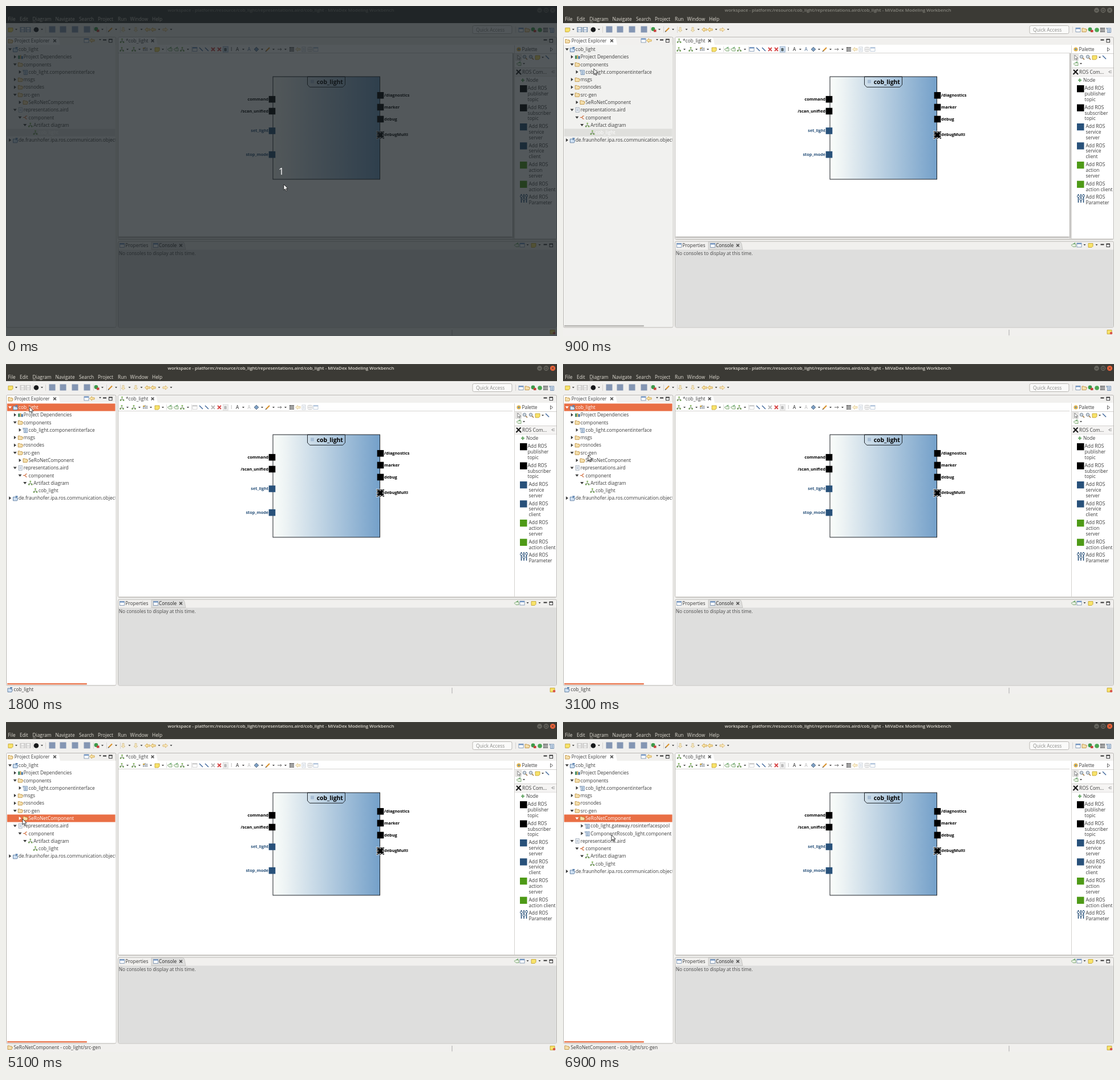
These frames come from a looping animation (966 px wide and 579 px high, 8000 ms). An HTML page:

```html
<!DOCTYPE html>
<html lang="en">
<head>
<meta charset="utf-8">
<title>Workspace</title>
<style>
html, body { margin: 0; width: 100%; height: 100%; overflow: hidden; background: #f1f0ee; }
svg { display: block; width: 100%; height: 100%; }
text { font: 8.35px "Open Sans", "Noto Sans", sans-serif; white-space: pre; }
.b { font-weight: 700; font-size: 7.35px; }
.name { font-weight: 700; font-size: 10.4px; }
.title { font-weight: 600; font-size: 7.9px; fill: #87867e; }
.active .title { fill: #dfdbd2; }
.close { fill: #64635c; }
.active .close { fill: #e9633a; }
.treebg { fill: #f1f1ef; }
.active .treebg { fill: #fff; }
.row { color: #3c3c3c; }
.row.sel { color: #fff; }
.hl { fill: #dfdfdc; }
.focus .hl { fill: #e96f45; }
.bar { fill: #b9b8b5; }
.active .bar { fill: #ea7b55; }
.active .off { filter: grayscale(1); opacity: .45; }
.count { font-size: 17px; fill: #fff; }
</style>
</head>
<body>
<svg id="stage" viewBox="0 0 966 579" preserveAspectRatio="none"></svg>
<script>
const stage = document.getElementById('stage');
const INK = '#3c3c3c', EDGE = '#bbb9b5', BLUE = '#28517a', GREEN = '#4e9a17';

const rect = (x, y, w, h, fill, more = '') =>
  `<rect x="${x}" y="${y}" width="${w}" height="${h}" fill="${fill}" ${more}/>`;
const shape = (d, fill, more = '') => `<path d="${d}" fill="${fill}" ${more}/>`;
const line = (d, color = INK, w = 1) => shape(d, 'none', `stroke="${color}" stroke-width="${w}"`);
const dot = (x, y, r, fill, more = '') => `<circle cx="${x}" cy="${y}" r="${r}" fill="${fill}" ${more}/>`;
const text = (x, y, s, fill = INK, more = '') => `<text x="${x}" y="${y}" fill="${fill}" ${more}>${s}</text>`;
const group = (s, more = '') => `<g ${more}>${s}</g>`;
const at = (x, y, s) => group(s, `transform="translate(${x} ${y})"`);

// small icons, drawn around their own centre
const icon = {
  folder: shape('M-4-3h3l1 1h3v1.5h1.5l-1.5 4h-7z', '#f4dfad', 'stroke="#b98a35" stroke-width=".8"'),
  project: shape('M-4-2h3l1 1h3v1.5h1.5l-1.5 4h-7z', '#cfe0f2', 'stroke="#4d6f96" stroke-width=".8"') + rect(0, -4, 4, 2.5, '#5b82b0'),
  lib: rect(-4, -2.5, 3, 6, '#3c8b62') + rect(-.8, -3, 2, 6.5, '#c9a04a') + rect(1.5, -1.5, 3, 5, '#4a78a8'),
  doc: rect(-3, -4, 6, 8, '#fff', 'stroke="#8a99ab" stroke-width=".8"') + line('M-1.5-1.5h3M-1.5 0h3M-1.5 1.5h3', '#7a93b2', .7),
  model: rect(-2.5, -3, 6, 7.5, '#e4edf7', 'stroke="#5e7fa5" stroke-width=".8"') + line('M-1-1h3M-1 1h3M-1 3h3M-4-4v3', '#46709c', .8),
  comp: line('M-4 0h3M3-2.5h-2l-2 2.5l2 2.5h2', '#cf6a3a', 1.2),
  chart: line('M0-2v2M-2.5 3v-2h5v2', '#55704a', .8) + rect(-1.3, -4, 2.6, 2.4, '#8dbb6a') + rect(-3.8, 1.5, 2.6, 2.2, '#6c9a52') + rect(1.2, 1.5, 2.6, 2.2, '#6c9a52'),
  save: rect(-4, -4, 8, 8, '#a9bcd3', 'stroke="#71879f" stroke-width=".8"') + rect(-2, -3.5, 4, 2.8, '#f5f7fa') + rect(-2, 1, 4, 3, '#e5eaf0'),
  window: rect(-4, -3.5, 8, 7, '#fff', 'stroke="#7189a8" stroke-width=".8"') + rect(-4, -3.5, 8, 2, '#6e94c4'),
  note: shape('M-4-3h8v5l-2 2h-6z', '#f8e36b', 'stroke="#bd9d27" stroke-width=".8"'),
  pencil: line('M-3 3L3-3', '#d9932e', 2.2) + line('M-4 4l1.5-1.5', '#555', 1.2),
  stroke: line('M-3-3L3 3', '#41689b', 1.4),
  cross: line('M-3-3L3 3M3-3L-3 3', '#d64545', 1.8),
  arrow: line('M-4 0h7M1-2l2 2l-2 2', '#555', .9),
  back: shape('M-4.5 0l4-3.5v2h4.5v3h-4.5v2z', '#fbe6ab', 'stroke="#c79b3b" stroke-width=".8"'),
  next: shape('M4.5 0l-4-3.5v2h-4.5v3h4.5v2z', '#fbeac0', 'stroke="#d2ae62" stroke-width=".8"'),
  step: shape('M-2-4h3v5h2l-3.5 3l-3.5-3h2z', '#f7e7bd', 'stroke="#ccb98a" stroke-width=".7"'),
  run: dot(-1, -1, 3.4, '#3d9a49') + rect(0, 0, 4.5, 4, '#c8413c'),
  grid: rect(-4, -4, 8, 8, '#666') + line('M-4-1h8M-4 1.5h8M-1-4v8M2-4v8', '#ddd', .8),
  bars: line('M-3-3v6M0-4v7M3-3v6', '#6a7581', 1.2) + rect(-4, -3, 3, 2, '#d6a93e'),
  pin: shape('M-4 0l3-2h5v5h-5z', '#e6efe0', 'stroke="#6e9d66" stroke-width=".8"') + line('M0-2l3-2', '#4f9954', 1.1),
  zoom: dot(-1, -1, 2.7, '#eef3f8', 'stroke="#6b7d90"') + line('M1 1l3 3', '#9a7440', 1.5) + line('M-2.3-1h2.6', '#567', .7),
  frame: line('M-3.5-3.5h7v7h-7zM0-4.5v9M-4.5 0h9', '#909090', .8),
  select: shape('M-2-4v8l2-2l1.5 3l1-.6l-1.4-2.8h2.5z', '#fff', 'stroke="#555" stroke-width=".7"'),
  plus: line('M-3 0h6M0-3v6', '#68a868', 2)
};
const put = (name, x, y) => at(x, y, icon[name]);
const drop = (x, y) => shape(`M${x - 2} ${y - 1}h4l-2 2.4z`, '#444');
const shut = (x, y) => line(`M${x - 2.4} ${y - 2.4}l4.8 4.8m0-4.8l-4.8 4.8`, '#555', 1.5);
const minMax = (x, y) => rect(x - 3, y - 2.5, 6, 2, '#333') +
  rect(x + 7.5, y - 2.7, 5.5, 5.4, '#fff', 'stroke="#333"') + rect(x + 7, y - 3.2, 6.5, 1.8, '#333');
const panel = (x, y, w, h, fill) => rect(x, y, w, h, fill, `rx="2.5" stroke="${EDGE}"`);

function titleAndMenu() {
  const menu = [['File', 3.5], ['Edit', 24], ['Diagram', 46.5], ['Navigate', 86.5], ['Search', 128],
    ['Project', 161], ['Run', 196], ['Window', 217.5], ['Help', 256]];
  return rect(0, 0, 966, 30, '#3b3a35') + rect(0, 0, 966, 1, '#4c4b45') +
    text(482, 10.4, 'workspace - platform:/resource/cob_light/representations.aird/cob_light - MiVaDex Modeling Workbench', '', 'class="title" text-anchor="middle"').replace('fill=""', '') +
    dot(935.5, 7.5, 4.4, '#64635c') + dot(947, 7.5, 4.4, '#64635c') + '<circle cx="958.5" cy="7.5" r="4.6" class="close"/>' +
    line('M933.5 8h4M945 5.8h4v3.5h-4zM956.8 5.8l3.4 3.4m0-3.4l-3.4 3.4', '#302f2b', .9) +
    menu.map(([s, x]) => text(x, 26.3, s, '#dfdbd2')).join('') + line('M47 28h5.5', '#dfdbd2', .6);
}

function toolbar() {
  const marks = [81, 100, 121, 142].map(x => rect(x - 5.5, 35.5, 11, 11, '#8496b3')).join('');
  return rect(0, 30, 966, 23, '#f1f0ee') + put('note', 8, 41.5) +
    group(put('save', 29, 41.5) + put('save', 39, 41.5), 'class="off"') +
    dot(53, 41.5, 4.3, '#17191b') + marks + put('run', 159, 41.5) + put('pencil', 183, 41.5) +
    put('step', 206, 41.5) + put('step', 228, 41.5) + put('back', 248, 41.5) + put('back', 258, 41.5) + put('next', 279, 41.5) +
    [18, 63, 169, 193, 216.5, 237.5, 268.5, 289.5].map(x => drop(x, 41)).join('') +
    [47, 69, 153, 176, 200, 893].map(x => line(`M${x}.5 36v11`, '#d5d3d0')).join('') +
    panel(818, 34.5, 69, 14, '#fafaf9') + text(824, 44.6, 'Quick Access', '#8a8a88') +
    put('window', 903, 42) + put('folder', 914, 42) + put('run', 925, 42) + dot(936, 42, 3.8, '#4ba653') +
    put('grid', 946, 42) + put('model', 957, 42);
}

const rowY = i => 76 + 13.28 * i;
const rows = [
  [0, 1, 'project', 'cob_light'], [1, 0, 'lib', 'Project Dependencies'], [1, 1, 'folder', 'components'],
  [2, 0, 'model', 'cob_light.componentinterface'], [1, 0, 'folder', 'msgs'], [1, 0, 'folder', 'rosnodes'],
  [1, 1, 'folder', 'src-gen'], [2, 0, 'folder', 'SeRoNetComponent'], [1, 1, 'doc', 'representations.aird'],
  [2, 1, 'comp', 'component'], [3, 1, 'chart', 'Artifact diagram'], [4, -1, 'chart', 'cob_light'],
  [0, 0, 'project', 'de.fraunhofer.ipa.ros.communication.objects']
];
const extra = [[3, 0, 'model', 'cob_light.gateway.rosinterfacespool'], [3, 0, 'model', 'ComponentRoscob_light.component']];

function treeRow([level, open, pic, label], i) {
  const x = 7 + 8.75 * level, y = rowY(i);
  const tri = open < 0 ? '' : at(x, y, shape('M-1.8-3l4 3l-4 3z', 'currentColor', `class="tri" transform="rotate(${open * 90})"`));
  return group(tri + put(pic, x + 9.5, y) + text(x + 15, y + 3, label, 'currentColor'), 'class="row"');
}

function explorer() {
  const low = rows.slice(8).map((r, i) => treeRow(r, i + 8)).join('');
  return panel(.5, 54.5, 192.5, 509.5, '#f1f0ee') +
    shape('M1 68.5V57q0-2 2-2h86q3 0 4 4l2 9.5z', '#fff') + rect(1.5, 68, 191, 495, '', 'class="treebg"').replace('fill=""', '') +
    put('folder', 8, 61.5) + text(14.7, 64, 'Project Explorer') + shut(85.5, 61) +
    put('window', 141, 60.5) + put('back', 151, 60.5) + drop(165, 59) + minMax(173, 61) +
    group('<rect class="hl" id="hl" x="2" width="190" height="13.2"/>' +
      rows.slice(0, 8).map(treeRow).join('') +
      group(extra.map((r, i) => treeRow(r, i + 8)).join(''), 'id="extra"') + group(low, 'id="low"'),
      'id="tree" clip-path="url(#treeclip)"') +
    '<rect id="bar" class="bar" x="2" y="560" width="140" height="2.6" rx="1"/>';
}

function editorTools() {
  const y = 76;
  const items = [['chart', 203], ['chart', 224], ['bars', 244], ['note', 265], ['pin', 287], ['pin', 298], ['chart', 309],
    ['stroke', 342], ['stroke', 352], ['cross', 374], ['pencil', 459], ['arrow', 480], ['grid', 501],
    ['back', 512], ['doc', 522], ['frame', 533], ['window', 543]];
  return items.map(([n, x]) => group(put(n, x, y), x > 505 ? 'opacity=".55"' : '')).join('') +
    group(put('window', 331, y) + put('cross', 363, y) +
      rect(380.5, 71, 9, 10, '#cfdded', 'stroke="#86a5c6" stroke-width=".7"') + text(382.3, 79, 'B', '#233', 'class="b"') +
      text(394, 79, 'I', '#333', 'font-style="italic"') + text(423.5, 79, 'A', '#4a6a90'), 'class="off"') +
    text(403, 79, 'A', '#222') + shape('M435 76l4-4l4 4l-4 4z', '#7d9fc4', 'stroke="#456" stroke-width=".7"') +
    [213, 234, 254, 275, 319, 416, 449, 469, 490].map(x => drop(x, y)).join('') +
    [281, 325].map(x => line(`M${x}.5 71v10`, '#ddd')).join('');
}

function port(x, y, label, side, fill) {
  const left = side < 0;
  return rect(x - 5.8, y - 5.8, 11.6, 11.6, fill) +
    text(left ? x - 6.3 : x + 6.5, y + 2.3, label, fill, `class="b" text-anchor="${left ? 'end' : 'start'}"`);
}

function diagram() {
  const handles = [-5.5, 0, 5.5].flatMap(a => [-5.5, 0, 5.5].map(b => a || b
    ? rect(656.3 + a - 1.3, 226.3 + b - 1.3, 2.6, 2.6, '#000', 'stroke="#fff" stroke-width=".7"') : '')).join('');
  return rect(468, 124, 187.5, 180, 'url(#fade)', 'stroke="#1c2126"') +
    shape('M528.5 124h66v14l-4 4.3h-58l-4-4.3z', 'none', 'stroke="#20262c"') +
    rect(534, 129.5, 6, 6, '#a9bfd6') + text(544.7, 136.7, 'cob_light', '#000', 'class="name"') +
    port(466.5, 163.7, 'command', -1, '#000') + port(466.5, 184.5, '/scan_unified', -1, '#000') +
    port(466.5, 219, 'set_light', -1, BLUE) + port(466.5, 260.7, 'stop_mode', -1, BLUE) +
    port(656.5, 156.8, '/diagnostics', 1, '#000') + port(656.5, 177.5, 'marker', 1, '#000') +
    port(656.5, 198.5, 'debug', 1, '#000') + port(656.5, 226, 'debugMulti', 1, '#000') + handles;
}

function palette() {
  const items = [['#000', 145, 'Add ROS|publisher|topic'], ['#000', 178.5, 'Add ROS|subscriber|topic'],
    [BLUE, 212, 'Add ROS|service|server'], [BLUE, 245.3, 'Add ROS|service|client'],
    [GREEN, 279, 'Add ROS|action|server'], [GREEN, 312.7, 'Add ROS|action client'], ['', 336, 'Add ROS|Parameter']];
  const sliders = [903.5, 908, 912.5].map((x, i) =>
    line(`M${x} 330v15`, BLUE, 1.6) + dot(x, [334, 339, 333][i], 2, '#fff', `stroke="${BLUE}"`)).join('');
  return rect(891, 69, 74, 338, '#fff') + line(`M891.5 69v339M892 83.5h73M892 108.5h73M892 123h73`, '#d3d1ce') +
    dot(899, 76, 3.6, '#e5b64a') + dot(899, 76, 1.5, '#5b8dc0') + text(904.5, 79.2, 'Palette') +
    shape('M954.5 73l4 3.2l-4 3.2z', 'none', 'stroke="#444" stroke-width=".8"') +
    rect(893.5, 85, 10, 10.5, '#e9e8e6', 'stroke="#c9c7c3" stroke-width=".6"') + put('select', 899, 90) +
    put('zoom', 910, 90) + put('zoom', 921, 90) + put('note', 932, 90) + drop(941, 90) + put('stroke', 949, 90) +
    put('pin', 899, 101.5) + drop(908, 101) + rect(892, 109, 73, 13.5, '#f5f4f3') +
    line('M895 112l8 8M902.5 111.5l-8 8.5', '#1b1b1b', 2.2) + text(905, 119, 'ROS Com...') +
    line('M962 114h-4v3h4M956 115.5h2', '#888', .8) + put('plus', 906, 130.3) + text(912, 133.3, 'Node') +
    items.map(([c, y, s]) => (c ? rect(901, y - 6, 12.5, 12.3, c) : sliders) +
      s.split('|').map((w, i) => text(i && /action c|Param/.test(w) ? 916.5 : c === '#000' ? 914.5 : 916.5, y + 2.3 + i * 9.8, w)).join('')).join('');
}

function editor() {
  return panel(196.5, 54.5, 769, 355, '#f1f0ee') + rect(197, 68, 768, 340.5, '#fff') +
    shape('M197 68.5V57q0-2 2-2h61q3 0 4 4l2 9.5z', '#fff') + put('chart', 203.5, 61) +
    text(210, 64, '*cob_light') + shut(257, 61) + minMax(945.5, 61) +
    line('M197 82.5h691M197 408.5h768', '#d6d4d1') + editorTools() + diagram() +
    group(rect(888, 82.5, 2.4, 325, '#bbb9b6') + rect(197.5, 404.5, 690, 2.4, '#bbb9b6'), 'id="scroll"') + palette();
}

function consolePane() {
  return panel(196.5, 413, 769, 151, '#f1f0ee') + rect(197, 427.5, 768, 136, '#dededd') +
    shape('M255 427.5v-14h54q3 0 4 4l2 10z', '#dededd', `stroke="${EDGE}" stroke-width=".7"`) +
    put('window', 203.5, 420) + text(209.3, 423, 'Properties') + put('window', 262.5, 420) +
    text(268, 423, 'Console', '#222') + shut(306.5, 420) +
    put('pin', 895, 419.5) + put('window', 905, 419.5) + drop(914.5, 419) + put('note', 925, 419.5) + drop(935.5, 419) +
    minMax(945.5, 420) + text(197.7, 436.6, 'No consoles to display at this time.', '#4a4a4a');
}

const status = '<g id="status"><g id="pic"></g><text id="msg" x="13.5" y="574" fill="#3c3c3c"></text></g>' +
  line('M782 568v10', '#aaa') + put('note', 958, 571.5) + dot(961, 574, 2.3, '#d8584d');

stage.innerHTML = `<defs>
  <linearGradient id="fade"><stop offset="0" stop-color="#fafdfa"/><stop offset=".12" stop-color="#edf3f4"/><stop offset="1" stop-color="#74a0c9"/></linearGradient>
  <clipPath id="treeclip"><rect x="1.5" y="68" width="190" height="492"/></clipPath></defs>` +
  rect(0, 0, 966, 579, '#f1f0ee') + titleAndMenu() + toolbar() + explorer() + editor() + consolePane() + status +
  group(rect(0, 0, 966, 579, '#181e22', 'opacity=".74"') + text(477.8, 295.8, '1', '#fff', 'class="count"'), 'id="veil"') +
  group(shape('M0 0v10l2.3-2.1l1.6 3.6l1.6-.7l-1.6-3.5h3.2z', '#fff', 'stroke="#111" stroke-width=".8"'), 'id="cursor"');

const $ = id => document.getElementById(id);
const rowEls = [...stage.querySelectorAll('#tree .row')];
const folderTri = rowEls[7].querySelector('.tri');

// [time, x, y] of the pointer tip
const path = [[0, 487, 313], [100, 492, 314], [300, 410, 303], [400, 235, 266], [500, 112, 239], [700, 65, 142],
  [900, 54, 110], [1000, 45, 88], [1200, 43, 81], [1300, 41, 76], [1400, 41, 75], [2200, 39, 103], [2300, 39, 140],
  [2400, 43, 157], [2600, 44, 162], [2700, 44, 166], [3100, 44, 160], [3200, 43, 158], [3300, 42, 157],
  [3700, 41, 161], [3800, 39, 164], [4000, 42, 170], [4100, 47, 174], [4200, 51, 173], [4300, 53, 170],
  [4600, 46, 171], [4700, 36, 173], [4900, 30, 173], [5100, 29, 170], [5200, 27, 167], [5400, 25, 165],
  [5600, 22, 169], [6000, 40, 177], [6200, 48, 179], [6300, 58, 182], [6500, 69, 190], [6700, 76, 194],
  [6800, 82, 197], [6900, 85, 198]];
const picks = [[0, 11], [1700, 0], [3200, 6], [4700, 7]];
const notes = [[0, '', ''], [1800, 'project', 'cob_light'], [3500, 'folder', 'src-gen - cob_light'],
  [4900, 'folder', 'SeRoNetComponent - cob_light/src-gen']];
const latest = (list, t) => list.findLast(k => k[0] <= t);
const show = (id, on) => $(id).setAttribute('visibility', on ? 'visible' : 'hidden');

function draw(t) {
  const [, x, y] = latest(path, t), [, pick] = latest(picks, t), [, pic, msg] = latest(notes, t);
  const open = t >= 5500;
  $('cursor').setAttribute('transform', `translate(${x} ${y})`);
  stage.classList.toggle('active', t >= 1600);
  stage.classList.toggle('focus', t >= 1700);
  $('hl').setAttribute('y', rowY(pick) - 6.6);
  rowEls.forEach((el, i) => el.classList.toggle('sel', i === (pick > 7 ? pick + extra.length : pick)));
  show('veil', t < 100);
  show('bar', t >= 500);
  show('scroll', t < 1400);
  show('extra', open);
  $('low').setAttribute('transform', `translate(0 ${open ? rowY(2) - rowY(0) : 0})`);
  folderTri.setAttribute('transform', `rotate(${open ? 90 : 0})`);
  if ($('msg').textContent !== msg) {
    $('msg').textContent = msg;
    $('pic').innerHTML = pic && put(pic, 7, 571);
  }
}

const start = performance.now();
function tick() {
  draw((performance.now() - start) % 8000);
  requestAnimationFrame(tick);
}
tick();
</script>
</body>
</html>
```
